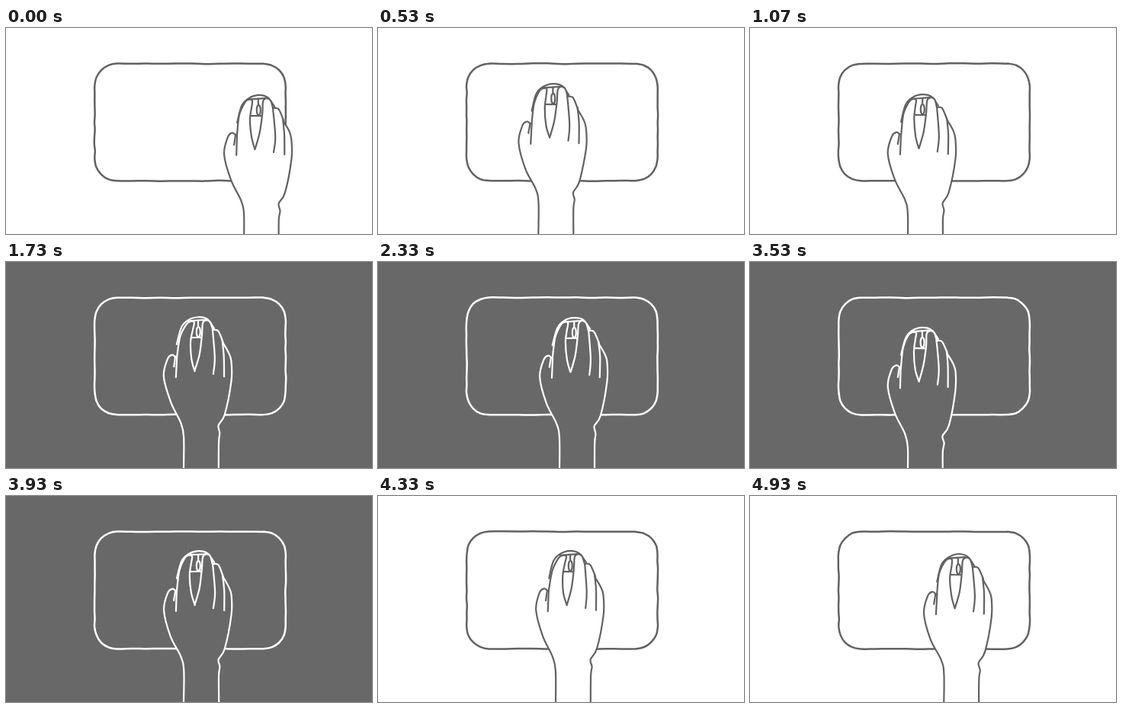
Animation of 480x270 px, one loop 4990 ms. Source, as an HTML page with a canvas:

```html
<!DOCTYPE html>
<html lang="en">
<head>
<meta charset="utf-8">
<title>Hand on a mouse</title>
<style>
  html, body { margin: 0; width: 100%; height: 100%; overflow: hidden; background: #fff; }
  canvas { display: block; width: 480px; height: 270px; }
</style>
</head>
<body>
<canvas id="stage"></canvas>
<script>
const LOOP = 4990, DRAWINGS = 60, CYCLE = 30;
const CLICK = 19, RELEASE = 23;
const GREY = '#626262', DARK = '#686868';

const canvas = document.getElementById('stage');
const ctx = canvas.getContext('2d');
const scale = window.devicePixelRatio || 1;
canvas.width = 480 * scale;
canvas.height = 270 * scale;

let seed = 1;
function jitter(amount) {
  seed = (seed * 16807) % 2147483647;
  return (seed / 2147483647 - 0.5) * 2 * amount;
}

// Turns "x,y x,y ..." into points
const pts = text => text.split(' ').map(p => p.split(',').map(Number));

// Adds a hand-drawn smooth curve through the points to the path
function curve(points) {
  const p = points.map(([x, y]) => [x + jitter(0.3), y + jitter(0.3)]);
  const at = i => p[Math.max(0, Math.min(p.length - 1, i))];
  ctx.lineTo(...p[0]);
  for (let i = 0; i < p.length - 1; i++) {
    const [a, b, c, d] = [at(i - 1), at(i), at(i + 1), at(i + 2)];
    ctx.bezierCurveTo(
      b[0] + (c[0] - a[0]) / 6, b[1] + (c[1] - a[1]) / 6,
      c[0] - (d[0] - b[0]) / 6, c[1] - (d[1] - b[1]) / 6, ...c);
  }
}

function shape(curves, filled) {
  ctx.beginPath();
  curves.forEach(curve);
  if (filled) ctx.fill();
  ctx.stroke();
}

const thumb = pts('312,290 312,245 308,226 295,200 286,166 291,143 297,137.5 301,140');
const index = pts('303,141 306,114 313,98 318,94 323,95 322,104 320,120 322,143 326.5,159');
const middle = pts('326.5,159 333,137 336,112 337,96 342,92 347,95 350,105');
const ring = pts('350,105 357,106 363,119 364,123');
const side = pts('364,123 371,135 374.5,146 374.5,172 366,216 358,230 359.5,240 358,252 358,290');
const creases = ['301,140 299,153', '303,141 302,167', '350,105 353,142 351,163', '363,119 365,140 365,166'].map(pts);
const shell = pts('303,124 309,102 318,92 331,88 343,91 352,103');
const buttons = ['318,93.5 340,92', '331,93 331,101', '319,115 337,115'].map(pts);

// Rounded rectangle: an arc at each corner, then a wobbly side to the next one
function drawPad() {
  const left = 116.3, right = 366.7, top = 46.7, bottom = 200.3, r = 29, steps = 10;
  const arcPoint = (q, angle) => [
    (q < 2 ? right - r : left + r) + r * Math.cos(angle),
    (q % 3 ? bottom - r : top + r) + r * Math.sin(angle)
  ];
  const quarter = Math.PI / 2, points = [];
  for (let q = 0; q < 4; q++) {
    for (let i = 0; i <= 4; i++) points.push(arcPoint(q, (q - 1 + i / 4) * quarter));
    const [x0, y0] = arcPoint(q, q * quarter);
    const [x1, y1] = arcPoint((q + 1) % 4, q * quarter);
    for (let i = 1; i < steps; i++) {
      const u = i / steps;
      points.push([x0 + (x1 - x0) * u + jitter(0.3), y0 + (y1 - y0) * u + jitter(0.3)]);
    }
  }
  shape([[...points, points[0]]]);
}

function drawMouse() {
  shape([shell], true);
  buttons.forEach(line => shape([line]));
  ctx.beginPath();
  ctx.ellipse(331.3, 107.5, 2.5, 6.5, 0, 0, Math.PI * 2);
  ctx.stroke();
}

// A pressing index finger leans towards the wheel
function drawHand(pressed) {
  const lean = pressed ? 0.06 : 0;
  const finger = index.map(([x, y]) => [x + lean * Math.max(0, 141 - y), y]);
  shape([thumb, finger, middle, ring, side], true);
  creases.forEach(line => shape([line]));
}

const smooth = u => u * u * (3 - 2 * u);
const dash = u => u ** 16.5;
const moves = [
  { from: 0, x: 0, y: 0, ease: smooth },
  { from: 7, x: -107.5, y: -16, ease: smooth },
  { from: 13, x: -105, y: -1, ease: smooth },
  { from: 17, x: -79, y: -16, ease: dash },
  { from: CYCLE, x: 0, y: 0 }
];

function handOffset(n) {
  const i = moves.findIndex(move => move.from > n);
  const a = moves[i - 1], b = moves[i];
  const e = a.ease((n - a.from) / (b.from - a.from));
  return [a.x + (b.x - a.x) * e, a.y + (b.y - a.y) * e];
}

function draw(drawing) {
  const n = drawing % CYCLE;
  const dark = drawing >= CLICK && drawing < CLICK + CYCLE;
  seed = 7919 * (n + 1);
  ctx.setTransform(scale, 0, 0, scale, 0, 0);
  ctx.fillStyle = dark ? DARK : '#fff';
  ctx.strokeStyle = dark ? '#fff' : GREY;
  ctx.lineWidth = 2.5;
  ctx.lineCap = ctx.lineJoin = 'round';
  ctx.fillRect(0, 0, 480, 270);
  drawPad();
  ctx.translate(...handOffset(n));
  ctx.lineWidth = 2.2;
  drawMouse();
  drawHand(n >= CLICK && n < RELEASE);
}

// Drawings are shown at twelve per second
const start = performance.now();
function tick() {
  const t = (performance.now() - start) % LOOP;
  draw(Math.floor(t / LOOP * DRAWINGS + 0.3) % DRAWINGS);
  requestAnimationFrame(tick);
}
tick();
</script>
</body>
</html>
```
